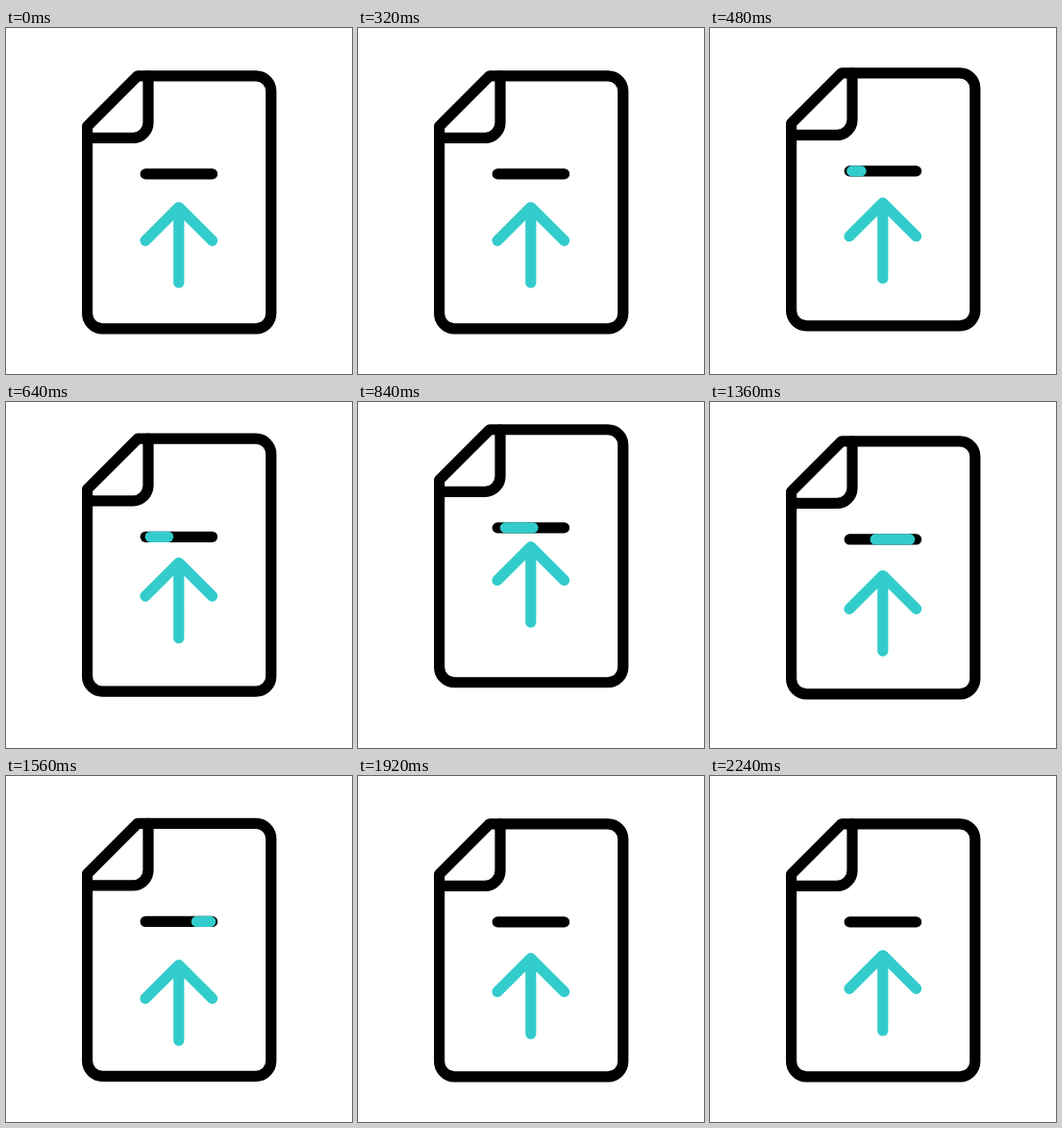
These frames come from a looping animation (360 px wide and 360 px high, 2480 ms). An HTML page:

```html
<!DOCTYPE html>
<html lang="en">
<head>
<meta charset="utf-8">
<title>Upload</title>
<style>
  html, body { margin: 0; width: 100%; height: 100%; overflow: hidden; background: #fff; }
  svg { display: block; width: 100%; height: 100%; }
  path { fill: none; stroke: #000; stroke-width: 11.2; stroke-linecap: round; stroke-linejoin: round; }
  .accent { stroke: #33cccc; }
</style>
</head>
<body>
<svg viewBox="0 0 360 360">
  <g id="page">
    <path d="M84.6 102.2 L137 49.8 H260 A15.8 15.8 0 0 1 275.8 65.6 V297 A15.8 15.8 0 0 1 260 312.8 H100.4 A15.8 15.8 0 0 1 84.6 297 Z"/>
    <path d="M148 49.8 V98.4 A16 16 0 0 1 132 114.4 H84.6"/>
    <path d="M145.2 151.9 H214.6"/>
    <path id="progress" class="accent"/>
  </g>
  <path id="arrow" class="accent" d="M145 221.3 L179.8 186.5 L214.6 221.3 M179.8 186.5 V265"/>
</svg>
<script>
  const LOOP = 2480, STEP = 40;
  const BAR_LEFT = 145.2, BAR_LENGTH = 69.4, BAR_Y = 151.9;
  const byId = id => document.getElementById(id);
  const page = byId('page'), arrow = byId('arrow'), progress = byId('progress');

  // Progress of t from start to end, clamped to 0..1.
  const ramp = (t, start, end) => Math.min(1, Math.max(0, (t - start) / (end - start)));
  const ease = (t, start, end) => {
    const u = ramp(t, start, end);
    return u * u * (3 - 2 * u);
  };

  const pageY = t => 22 * (ease(t, 1040, 1610) - ease(t, 350, 910));

  // Rises, drops past its resting place, then settles.
  const arrowY = t => -37.5 * ease(t, 360, 910) + 48.3 * ease(t, 995, 1600) - 10.8 * ease(t, 1600, 2100);

  // The head slows down along the bar; the tail creeps, then catches up.
  const head = t => Math.sin(ramp(t, 320, 1780) * Math.PI / 2);
  const tail = t => 0.19 * ramp(t, 320, 1160) + 0.81 * ease(t, 1160, 1780);

  const shift = (node, y) => node.setAttribute('transform', `translate(0 ${y})`);
  const barX = part => BAR_LEFT + BAR_LENGTH * part;

  function draw(time) {
    const t = Math.floor(time % LOOP / STEP) * STEP;
    const from = tail(t), to = head(t);
    shift(page, pageY(t));
    shift(arrow, arrowY(t));
    progress.setAttribute('d', to > from ? `M${barX(from)} ${BAR_Y} H${barX(to)}` : '');
  }

  const start = performance.now();
  function tick() {
    draw(performance.now() - start);
    requestAnimationFrame(tick);
  }
  tick();
</script>
</body>
</html>
```
